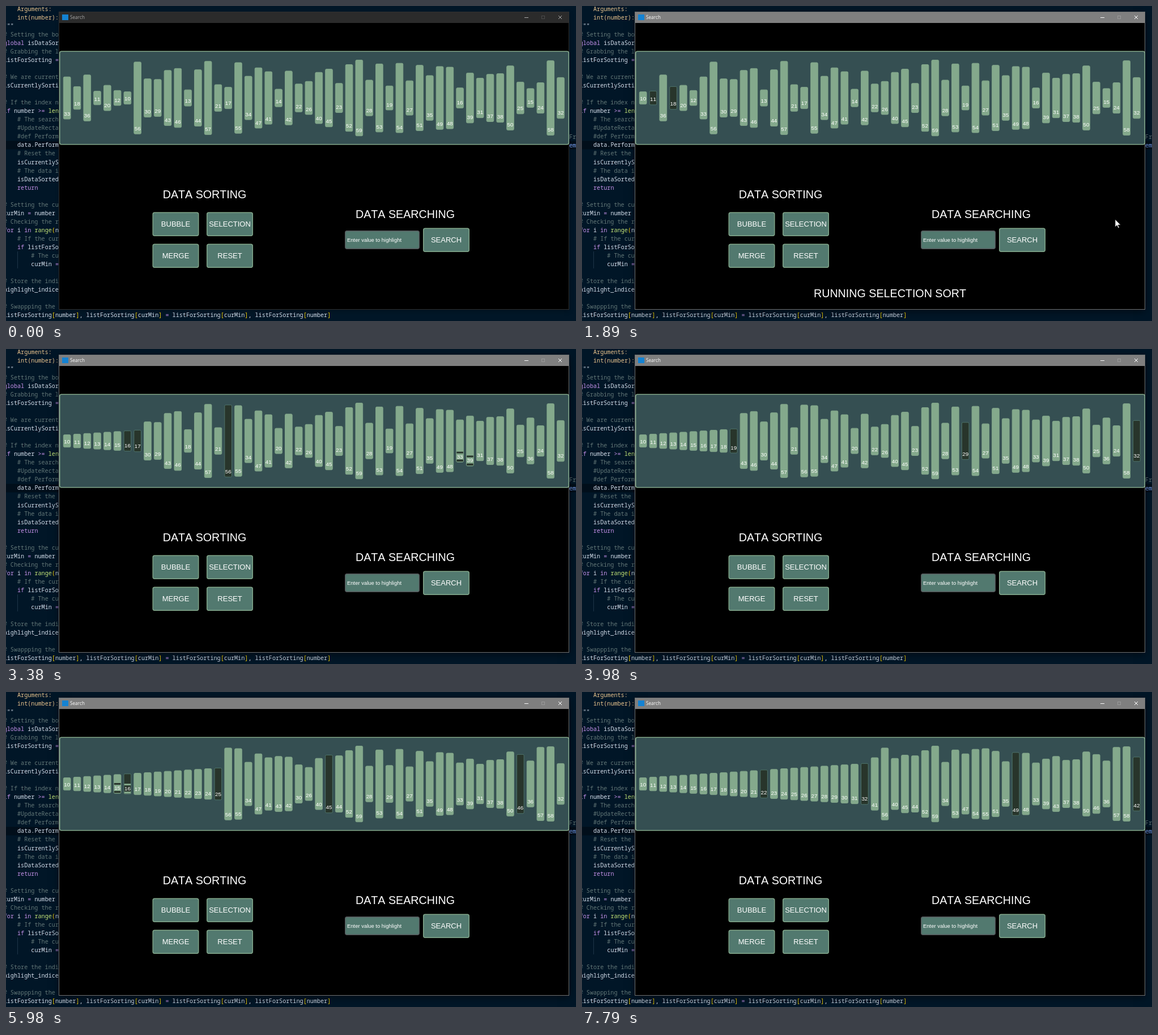
An HTML page with a canvas that plays this animation: 1006x557 px, repeating every 8 s.

```html
<!DOCTYPE html>
<html lang="en">
<head>
<meta charset="utf-8">
<title>Selection sort</title>
<style>
  html, body { margin: 0; width: 1006px; height: 557px; overflow: hidden; background: #011627; }
  canvas { display: block; }
</style>
</head>
<body>
<canvas width="1006" height="557"></canvas>
<script>
const ctx = document.querySelector('canvas').getContext('2d');
const LOOP = 8000, ACTIVATE = 550;
const SAGE = '#84a98c', TEAL = '#52796f', SLATE = '#354f52', DARK = '#28352b', HOVER = '#144870';
const SANS = '"Liberation Sans", Arial, sans-serif';
const MONO = '"Noto Sans Mono", monospace';

const START = [
  33, 18, 36, 11, 20, 12, 10, 56, 30, 29, 43, 46, 13, 44, 57, 21, 17, 55, 34, 47, 41, 14, 42, 22, 26,
  40, 45, 23, 52, 59, 28, 53, 19, 54, 27, 51, 35, 49, 48, 16, 39, 31, 37, 38, 50, 25, 15, 24, 58, 32
];

const CODE = `    Arguments:
    int(number):
"""
# Setting the boo
global isDataSort
# Grabbing the li
listForSorting = 

# We are currentl
isCurrentlySortin

# If the index nu
if number >= len(
    # The search 
    #UpdateRectan
    #def PerformS
    data.PerformS
    # Reset the s
    isCurrentlySo
    # The data is
    isDataSorted 
    return

# Setting the cur
curMin = number
# Checking the re
for i in range(nu
    # If the curr
    if listForSor
        # The cur
        curMin = 

# Store the indic
highlight_indices

# Swappping the v
listForSorting[number], listForSorting[curMin] = listForSorting[curMin], listForSorting[number]`.split('\n');

// states[0] is unsorted; states[s + 1] follows selection step s.
const states = [{ list: START, marked: [] }];
for (let s = 0; s < 23; s++) {
  const list = [...states[s].list];
  const min = list.indexOf(s + 10);
  [list[s], list[min]] = [list[min], list[s]];
  states.push({ list, marked: [s, min] });
}
const stepTime = s => 1320 + 290 * s + (s >= 10 ? 20 : 0) + (s >= 18 ? 20 : 0);

function text(str, x, y, size, { color = '#fff', font = SANS, align = 'center', weight = 400 } = {}) {
  ctx.font = `${weight} ${size}px ${font}`;
  ctx.fontKerning = 'none';
  ctx.textAlign = align;
  ctx.fillStyle = color;
  ctx.fillText(str, x, y + size * 0.36);
}

function box(x, y, w, h, fill, stroke, line = 1, radius = 3) {
  ctx.beginPath();
  ctx.roundRect(x + line / 2, y + line / 2, w - line, h - line, radius);
  ctx.fillStyle = fill;
  ctx.fill();
  ctx.strokeStyle = stroke;
  ctx.lineWidth = line;
  ctx.stroke();
}

function tokenColor(token, row) {
  if (row < 2) return '#ecc48d';
  if (token[0] === '#') return '#637777';
  if (/^(global|if|for|in|return|=|>=)$/.test(token)) return '#c792ea';
  if (/^(len|range)$/.test(token)) return '#c5e478';
  if (/^[[\]()]$/.test(token)) return '#ffd700';
  return '#d6deeb';
}

function drawEditor() {
  ctx.fillStyle = '#011627';
  ctx.fillRect(0, 0, 1006, 557);
  ctx.fillStyle = '#010e1a';
  ctx.fillRect(0, 238.5, 1006, 15);
  ctx.fillStyle = '#1d3448';
  ctx.fillRect(20, 434, 1, 30);
  const code = (str, x, y, color) =>
    text(str, x, y, 10.13, { color, font: MONO, align: 'left', weight: 500 });
  CODE.forEach((line, row) => {
    for (const m of line.matchAll(/#.*|\w+|>=|[^\s\w]/g))
      code(m[0], -4.3 + m.index * 6.08, 5.5 + row * 15.02, tokenColor(m[0], row));
  });
  code('Fr', 994, 231, '#637777');
  code('em', 994, 246, '#82aaff');
}

function line(points, color, width = 1) {
  ctx.beginPath();
  points.forEach(([x, y]) => ctx.lineTo(x, y));
  ctx.strokeStyle = color;
  ctx.lineWidth = width;
  ctx.stroke();
}

function drawWindow(active) {
  ctx.save();
  ctx.shadowColor = `rgba(0,0,0,${active ? 0.5 : 0.25})`;
  ctx.shadowBlur = active ? 14 : 7;
  ctx.shadowOffsetY = 3;
  ctx.fillStyle = '#000';
  ctx.fillRect(94, 10, 900, 527);
  ctx.restore();
  ctx.fillStyle = active ? '#7f7f7f' : '#2b2b2b';
  ctx.fillRect(94, 10, 900, 20);
  ctx.strokeStyle = active ? '#707070' : '#303030';
  ctx.lineWidth = 1;
  ctx.strokeRect(93.5, 10.5, 900, 526);
  ctx.fillStyle = '#1482d2';
  ctx.fillRect(99, 15, 11, 10);
  const ink = active ? '#fff' : '#aaa';
  text('Search', 113, 20, 8.2, { color: ink, font: '"Open Sans", sans-serif', align: 'left' });
  line([[915, 20.5], [922, 20.5]], ink);
  ctx.strokeStyle = active ? '#999' : '#4a4a4a';
  ctx.strokeRect(945.5, 17.5, 5, 5);
  line([[975, 17], [981, 23]], ink);
  line([[981, 17], [975, 23]], ink);
}

function button(label, x, y, hovered) {
  box(x, y, 82, 42.5, hovered ? HOVER : TEAL, SAGE, 1.4);
  text(label, x + 41, y + 21, 13);
}

function drawControls(hovered, running) {
  text('DATA SORTING', 350.5, 333, 19.7);
  button('BUBBLE', 258.5, 364.5);
  button('SELECTION', 354, 364.5, hovered);
  button('MERGE', 258.5, 420.5);
  button('RESET', 354, 420.5);
  text('DATA SEARCHING', 704.5, 367.5, 19.7);
  box(598, 397, 132, 33, TEAL, '#565b5e', 1.4);
  text('Enter value to highlight', 602, 413.5, 9.45, { align: 'left' });
  button('SEARCH', 736, 392.5);
  if (running) text('RUNNING SELECTION SORT', 543.5, 508, 19.7);
}

const barX = i => 100.9 + 17.78 * i;
const labelY = value => 162.6 + value * 1.145 - 10.3;
// A bar lights up when its index or its value is among the marked indices.
const isMarked = (state, i) => state.marked.includes(i) || state.marked.includes(state.list[i]);

function barBody(i, value, marked) {
  const h = value * 2.29;
  box(barX(i), 162.6 - h / 2, 13.6, h, marked ? DARK : SAGE, marked ? TEAL : SAGE, 0.9, 2);
}

function drawBar(i, state) {
  const value = state.list[i];
  barBody(i, value, isMarked(state, i));
  text(value, barX(i) + 6.8, labelY(value), 9.8);
}

// Half-repainted bar: the label still sits on leftovers of the old look.
function drawPartialBar(i, before, after) {
  const old = before.list[i], now = after.list[i];
  const was = isMarked(before, i), is = isMarked(after, i);
  if (old !== now) {
    barBody(i, old, was);
    barBody(i, now, is);
    text(old, barX(i) + 6.8, labelY(old), 9.8);
    return;
  }
  drawBar(i, after);
  if (was === is) return;
  ctx.fillStyle = was ? DARK : SAGE;
  ctx.fillRect(barX(i) + 1, labelY(now) - 8.5, 11.6, 3);
  ctx.fillRect(barX(i) + 1, labelY(now) + 5.5, 11.6, 3.5);
}

// Each step repaints the row in two sweeps that break off at the same bar.
function drawBars(t) {
  let step = -1;
  while (step < 22 && t >= stepTime(step + 1)) step++;
  const after = states[step + 1], before = states[Math.max(step, 0)];
  const age = step < 0 ? Infinity : t - stepTime(step);
  const cut = step * 4 % 52;
  box(94, 79.5, 900, 166, SLATE, SAGE, 1.5);
  START.forEach((_, i) => {
    if (age >= 50) drawBar(i, after);
    else if (age < 28 && i > cut) drawBar(i, before);
    else if (age >= 28 && i <= cut) drawBar(i, after);
    else drawPartialBar(i, before, after);
  });
}

const PATH = [
  [160, 1006, 310], [1000, 426, 371], [1320, 426, 371], [1630, 934, 377], [1860, 934, 377], [2010, 996, 377]
];

function pointerAt(t) {
  const k = PATH.findIndex(p => p[0] > t);
  if (k < 1) return null;
  const [t0, x0, y0] = PATH[k - 1], [t1, x1, y1] = PATH[k];
  const u = (t - t0) / (t1 - t0), e = u * u * (3 - 2 * u);
  return { x: x0 + (x1 - x0) * e, y: y0 + (y1 - y0) * e };
}

const ARROW = new Path2D('M0 0V14L3.3 11L5.5 16L7.6 15L5.4 10.3H10Z');
const HAND = new Path2D('M-1 1Q0-.6 1.3 1V6L3.5 6.3L6 7L7.5 8.5V12L6 15V17H-.5L-5 11Q-5.5 8.8-3.7 9L-1 11Z');

function drawPointer({ x, y }, hand) {
  ctx.save();
  ctx.translate(x, y);
  ctx.fillStyle = '#fff';
  ctx.strokeStyle = '#000';
  ctx.lineWidth = 1;
  const shape = hand ? HAND : ARROW;
  ctx.fill(shape);
  ctx.stroke(shape);
  ctx.restore();
}

function frame(now) {
  const t = now % LOOP;
  const pointer = pointerAt(t);
  const hovered = pointer && pointer.x >= 354 && pointer.x <= 436 && pointer.y >= 365 && pointer.y <= 407;
  drawEditor();
  drawWindow(t >= ACTIVATE);
  drawBars(t);
  drawControls(hovered, t >= stepTime(0) && t < stepTime(6));
  if (pointer) drawPointer(pointer, hovered);
  requestAnimationFrame(frame);
}
requestAnimationFrame(frame);
</script>
</body>
</html>
```
